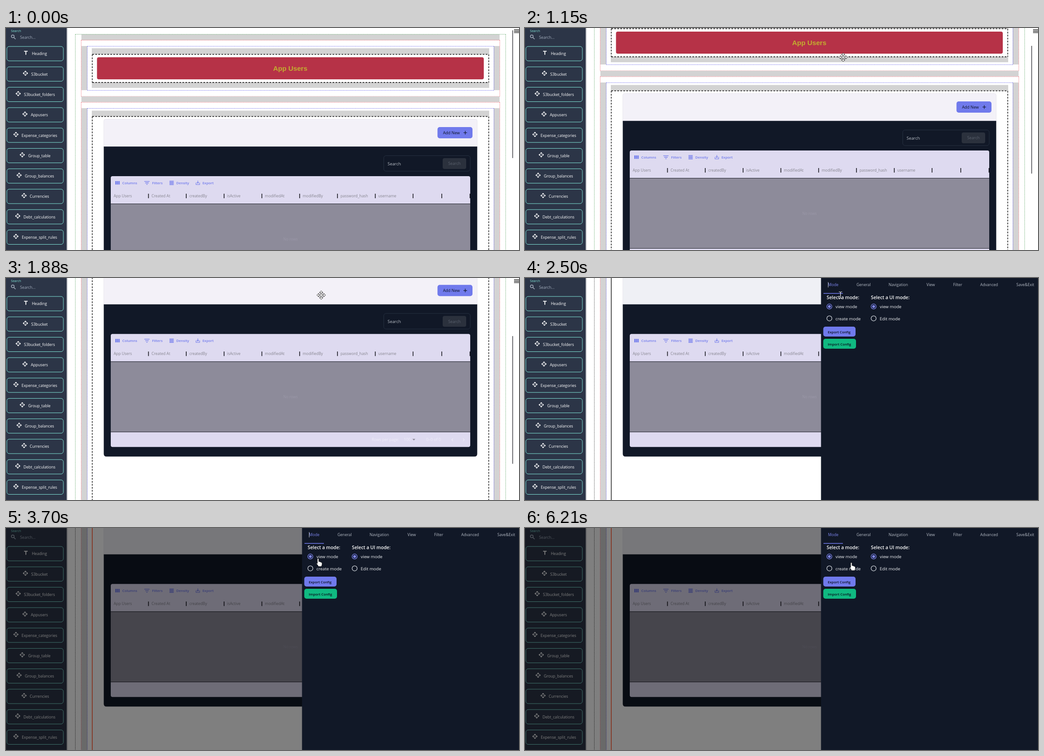
Recreate the animation shown at these times as an HTML page. Size 1136x493 px, loop 6350 ms.

```html
<!DOCTYPE html>
<html lang="en">
<head>
<meta charset="utf-8">
<title>App builder</title>
<style>
  html, body { margin: 0; width: 100%; height: 100%; overflow: hidden; background: #fff; }
  svg { display: block; width: 100%; height: 100%; }
  text { font-family: "Open Sans", "Noto Sans", sans-serif; white-space: pre; }
</style>
</head>
<body>
<svg id="stage" viewBox="0 0 1136 493" xmlns="http://www.w3.org/2000/svg"></svg>
<script>
const LOOP = 6350;
const NAVY = '#111827', VIOLET = '#707aec', GREY = '#d3d3d3', TEAL = '#81e6d9';

// Drawing helpers: boxes are given by their edges.
const box = (x1, y1, x2, y2, fill, extra = '') =>
  `<rect x="${x1}" y="${y1}" width="${x2 - x1}" height="${y2 - y1}" fill="${fill}" ${extra}/>`;
const frame = (x1, y1, x2, y2, color, extra) =>
  box(x1, y1, x2, y2, 'none', `stroke="${color}" ${extra}`);
const line = (x1, y1, x2, y2, color, w = 1) =>
  `<path d="M${x1} ${y1}L${x2} ${y2}" stroke="${color}" stroke-width="${w}"/>`;
const path = (d, color, w = 1.3, extra = '') =>
  `<path d="${d}" fill="none" stroke="${color}" stroke-width="${w}" ${extra}/>`;
const text = (x, y, str, size, fill, extra = '') =>
  `<text x="${x}" y="${y}" font-size="${size}" fill="${fill}" ${extra}>${str}</text>`;

// Dashed border whose four sides each start with a dash; dashes scale with the width.
const dashes = w => `${3 * w} ${2 * w}`;
const dashed = (x1, y1, x2, y2, color, w, extra = '') =>
  path(`M${x1} ${y1}H${x2}M${x1} ${y2}H${x2}M${x1} ${y1}V${y2}M${x2} ${y1}V${y2}`,
    color, w, `stroke-dasharray="${dashes(w)}" ${extra}`);

const SEMI = 'font-weight="600"', MEDIUM = 'font-weight="500"', MIDDLE = 'text-anchor="middle"';
const THIN = .67, THICK = 1.33;

function sidebar() {
  const items = [['Heading', 44], ['S3bucket', 43], ['S3bucket_folders', 27], ['Appusers', 42],
    ['Expense_categories', 22], ['Group_table', 36], ['Group_balances', 29], ['Currencies', 40],
    ['Debt_calculations', 26], ['Expense_split_rules', 22]];
  const arm = 'M0-6L2.1-3.9 4.6-6.4 0-11-4.6-6.4-2.1-3.9z';
  const api = [0, 90, 180, 270].map(a => `<path d="${arm}" transform="rotate(${a})"/>`).join('')
    + '<path d="M0-2L2 0 0 2-2 0z"/>';
  const rows = items.map(([name, x], i) => {
    const y = 57 + i * 45.28;
    const icon = i ? `<g transform="translate(${x} ${y - 1.8}) scale(.53)" fill="#fff">${api}</g>`
      : path(`M${x - 4} 51.7h8M${x} 51.7v7.8`, '#fff', 1.8);
    return frame(2, y - 16, 127, y + 16, TEAL, 'rx="5"') + icon
      + text(74, y + 3.4, name, 8.65, '#fff', `${MIDDLE} ${MEDIUM}`);
  });
  return box(134, 0, 137, 493, '#dcdde0') + box(0, 0, 134.5, 493, '#2c3547')
    + text(11, 8.8, 'Search', 7.1, TEAL, MEDIUM)
    + `<circle cx="15" cy="18.6" r="3.1" fill="none" stroke="#a9b3c2" stroke-width="1.3"/>`
    + path('M17.4 21l3.8 3.8', '#a9b3c2', 1.5)
    + text(31, 24, 'Search...', 8.7, '#a3aebd')
    + rows.join('');
}

// A dotted section with its grey margins.
const section = (top, bottom) =>
  box(167, top + 13, 180, bottom - 14, GREY) + box(1080, top + 13, 1093, bottom - 14, GREY)
  + dashed(166.5, top, 1093.5, bottom, '#ee3a47', THIN)
  + dashed(180, top + 13.5, 1080.5, bottom - 13.5, '#3d38e6', THIN);

function table() {
  const heads = ['App Users', 'Created At', 'createdBy', 'isActive', 'modifiedAt', 'modifiedBy', 'password_hash', 'username'];
  const tools = [[257.5, 'Columns'], [323.5, 'Filters'], [377, 'Density'], [435, 'Export']];
  const bars = [...heads.map((_, i) => 315.5 + i * 83.7), 965, 1027.5];
  const pale = '#efedf8';
  return box(232, 329, 1028, 580, '#dedaf0', 'rx="4"')
    + tools.map(([x, s]) => text(x, 346.9, s, 7.8, VIOLET, SEMI)).join('')
    + [242, 245.5, 249].map(x => box(x, 340, x + 2.6, 347.6, VIOLET)).join('')
    + path('M306.3 340.6h11.6M308.3 344h7.6M310.6 347.4h3', VIOLET)
    + path('M362 340.3h9.4M362 342.8h9.4M362 345.3h9.4M362 347.8h9.4', VIOLET, 1.5)
    + path('M420.8 343.5v4.2h8v-4.2M424.8 339v5.6M422.6 342.6l2.2 2.2 2.2-2.2', VIOLET, 1.1)
    + heads.map((s, i) => text(238.5 + i * 83.7, 376.2, s, 8.45, '#86858f')).join('')
    + bars.map(x => line(x, 368, x, 378, '#15151c', 1.6)).join('')
    + box(232, 390, 1028, 547, '#8d8b9a')
    + line(232, 390.5, 1028, 390.5, '#1d1f29') + line(232, 546.5, 1028, 546.5, '#1d1f29')
    + text(630, 472, 'No rows', 8.4, '#9b98a8', MIDDLE)
    + text(810, 567, 'Rows per page:', 8.5, pale) + text(881, 567, '100', 8.7, pale)
    + '<path d="M900 562h6.4l-3.2 3.4z" fill="#8c8996"/>'
    + text(930.5, 567, '0–0 of 0', 8.9, pale)
    + path('M990 561l-2.8 3 2.8 3M1012 561l2.8 3-2.8 3', pale, 1.2);
}

function page() {
  return box(167, 14, 1093, 27, GREY)
    + dashed(153.5, 14, 1106.5, 900, '#2f8a3a', THIN, 'id="outer"')
    + section(27, 152) + box(167, 152, 1093, 164.5, GREY) + section(165, 860)
    + box(190, 45, 1070, 58, GREY) + box(190, 121, 1070, 133, GREY)
    + dashed(191, 58.5, 1069, 121, '#000', THICK)
    + box(201.5, 65, 1058, 114, '#b63247', 'rx="4"')
    + text(629.5, 94.5, 'App Users', 15, '#c2ae30',
      `${MIDDLE} style="font:bold 15.2px 'Liberation Sans',sans-serif"`)
    + box(190, 183.5, 1070, 196, GREY)
    + dashed(191, 196.5, 1069, 840, '#000', THICK, 'id="inner"')
    + box(216.5, 202.5, 1043.5, 270, '#f3f1f8', 'id="head" rx="4" stroke="#e6e4ec" stroke-width=".8"')
    + `<path d="M216.5 263.3h827v332q0 6-6 6h-815q-6 0-6-6z" fill="${NAVY}"/>`
    + box(955.5, 220, 1033, 245, VIOLET, 'rx="5"')
    + text(967.7, 236, 'Add New', 8.9, '#0d1426', MEDIUM)
    + path('M1013 232.5h8M1017 228.5v8', '#0d1426', 1.2)
    + frame(836.5, 283.5, 1028, 318, '#263041', 'rx="5"')
    + text(845, 304.8, 'Search', 9.4, '#bcc1c9')
    + box(967, 289, 1019, 313, '#2b313d', 'rx="4"')
    + text(993, 304.4, 'Search', 8.8, '#5b626e', MIDDLE)
    + table();
}

function drawer() {
  const tabs = [[671, 'Mode'], [734, 'General'], [805, 'Navigation'], [889, 'View'], [948, 'Filter'],
    [1008, 'Advanced'], [1088, 'Save&amp;Exit']];
  const radio = (x, y, label, on) => {
    const color = on ? '#7f87f3' : '#d5d9e0';
    return `<circle cx="${x}" cy="${y}" r="5.6" fill="none" stroke="${color}" stroke-width="1.3"/>`
      + (on ? `<circle cx="${x}" cy="${y}" r="3.1" fill="${color}"/>` : '')
      + text(x + 13.5, y + 4, label, 9.55, '#f1f3f6');
  };
  return box(655.5, 0, 1137, 493, NAVY)
    + tabs.map(([x, s], i) => text(x, 18.4, s, 8.65, i ? '#b4bac4' : '#7f87f3')).join('')
    + line(661, 34.3, 704, 34.3, VIOLET, 1.4)
    + text(668, 46.7, 'Select a mode:', 10.3, '#fff', SEMI)
    + text(766, 46.7, 'Select a UI mode:', 10.3, '#fff', SEMI)
    + radio(674, 63.3, 'view mode', true) + radio(674, 89.7, 'create mode')
    + radio(772, 63.3, 'view mode', true) + radio(772, 89.7, 'Edit mode')
    + box(660.5, 108, 732, 130, VIOLET, 'rx="5"') + box(660.5, 135, 733, 157, '#10b981', 'rx="5"')
    + text(670.5, 122.6, 'Export Config', 7.75, '#0a0f1e', SEMI)
    + text(670.5, 149.5, 'Import Config', 7.75, '#0a0f1e', SEMI)
    + box(670.9, 9, 671.8, 21, '#cfd3da', 'id="caret"');
}

function cursors() {
  const arms = 'M0-9.6L4-5.6H1.3V-1.3H5.6V-4L9.6 0 5.6 4V1.3H1.3V5.6H4L0 9.6-4 5.6H-1.3V1.3H-5.6V4L-9.6 0-5.6-4V-1.3H-1.3V-5.6H-4z';
  const hand = 'M-1.4 1.2a1.5 1.5 0 0 1 3 0V6.6q2.6-.6 2.8.9 2.2-.5 2.5 1 1.9-.2 2 1.5V13.2q-.6 2.8-2 4.3H1Q-1 13.6-3.5 11.3q-.6-1.9 2.1-.4z';
  return `<path id="move" d="${arms}" fill="#fff" stroke="#111" stroke-width=".9"/>`
    + path('M-3.6-7.5q3 0 3.6 1.2.6-1.2 3.6-1.2M0-6.3V6.3M-3.6 7.5q3 0 3.6-1.2.6 1.2 3.6 1.2', '#f4f4f4', 1.2, 'id="beam"')
    + `<path id="hand" d="${hand}" fill="#fff" stroke="#111" stroke-width=".8"/>`;
}

document.getElementById('stage').innerHTML =
  `<g id="page">${page()}</g>`
  + box(1121.2, 5, 1122.8, 289, '#4b4b50', 'id="thumb" rx=".8"')
  + path('M1125 3.6h11M1125 7h11M1125 10.4h11', '#000', 1.4)
  + sidebar()
  + box(0, 0, 1136, 493, '#000', 'id="dim"')
  + box(190.3, 0, 191.6, 493, '#b5492f', 'id="edge"')
  + `<g id="drawer">${drawer()}</g>` + cursors();

const el = id => document.getElementById(id);
const set = (id, name, value) => el(id).setAttribute(name, value);
const show = (id, on) => set(id, 'visibility', on ? 'visible' : 'hidden');

// Linear track through [time, value...] points.
function track(points, t, k = 1) {
  if (t <= points[0][0]) return points[0][k];
  for (let i = 1; i < points.length; i++) {
    const a = points[i - 1], b = points[i];
    if (t <= b[0]) return a[k] + (b[k] - a[k]) * (t - a[0]) / (b[0] - a[0]);
  }
  return points[points.length - 1][k];
}

const SCROLL = [[865, 0], [935, 15], [1404, 113], [1873, 204.7]];
const POINTER = [[590, 716, -16], [935, 708, 56], [1404, 700, 77], [1873, 698, 38], [2880, 699, 38],
  [3145, 691, 68], [3690, 691, 68], [4080, 719, 68.5], [5860, 719, 68.5], [5995, 722.5, 77]];
const CARET = [[2000, 3030], [3560, 4080], [4610, 5200], [5670, 6210]];

function draw(t) {
  const u = t < 600 ? 0 : 600 + Math.floor((t - 600) / 67) * 67;
  const scroll = track(SCROLL, u);
  set('page', 'transform', `translate(0 ${-scroll})`);
  set('thumb', 'transform', `translate(0 ${scroll * .605})`);

  const left = 1 - Math.min(1, Math.max(0, (u - 2010) / 270));
  const slide = 481 * left ** 3;
  set('drawer', 'transform', `translate(${slide} 0)`);
  show('drawer', left < 1);

  const covered = t >= 2420;
  set('outer', 'stroke', covered ? '#000' : '#2f8a3a');
  set('inner', 'stroke-dasharray', covered ? 'none' : dashes(THICK));
  set('head', 'fill', covered ? '#eff0f5' : '#f3f1f8');
  set('dim', 'opacity', t < 2580 ? 0 : t < 2650 ? .3 : .5);
  show('edge', t >= 2720);
  show('caret', left < 1 && CARET.some(([a, b]) => t >= a && t < b));

  const x = track(POINTER, u), y = track(POINTER, u, 2);
  const kind = 655 + slide > x ? 'move' : y < 50 ? 'beam' : 'hand';
  for (const id of ['move', 'beam', 'hand']) {
    set(id, 'transform', `translate(${x} ${y})`);
    show(id, id === kind);
  }
}

const start = performance.now();
function tick() {
  draw((performance.now() - start) % LOOP);
  requestAnimationFrame(tick);
}
tick();
</script>
</body>
</html>
```
